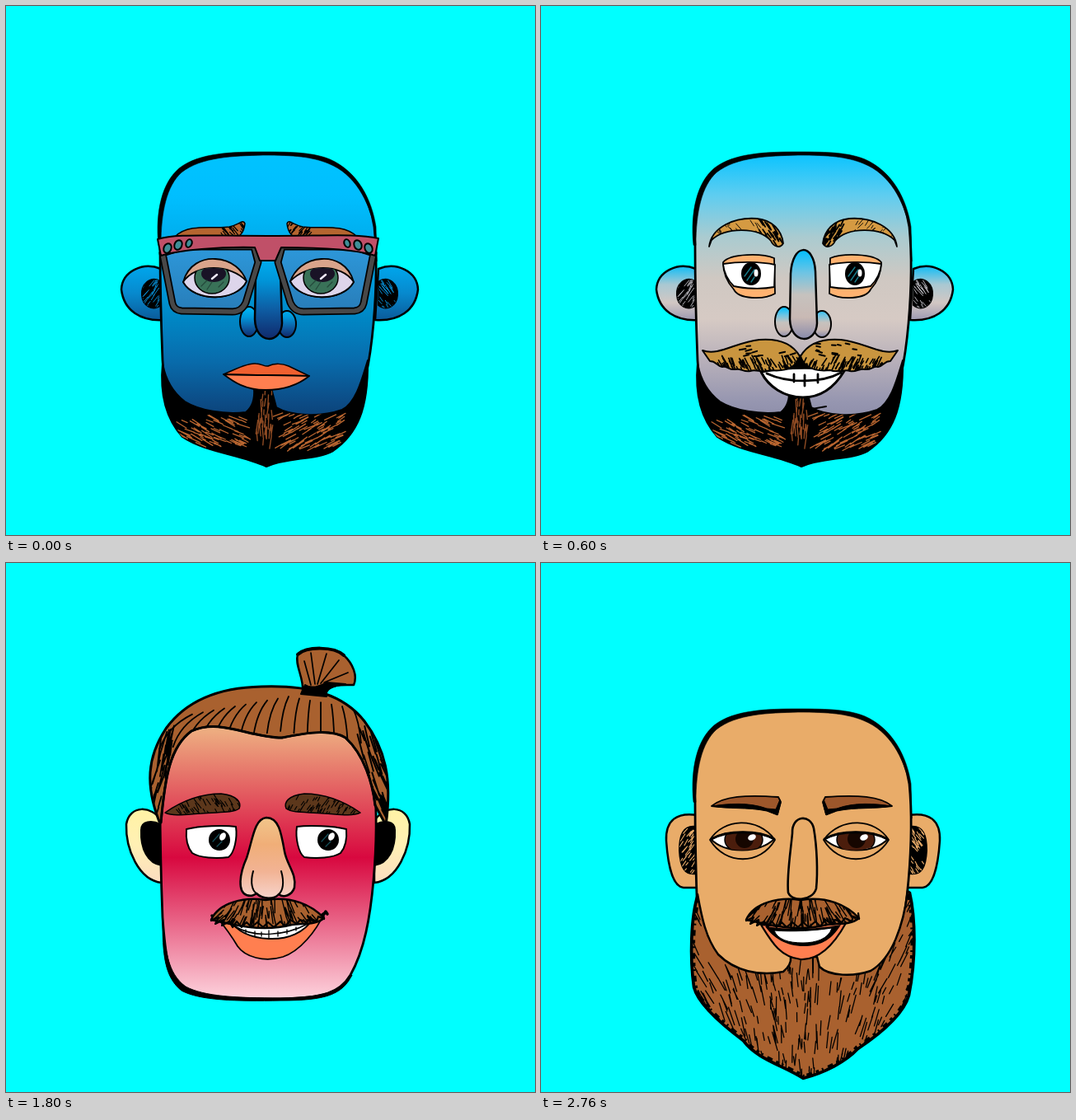
Animation of 642 by 642 pixels, one loop 3 s. Source, as an HTML page with a canvas:

```html
<!DOCTYPE html>
<html lang="en">
<head>
<meta charset="utf-8">
<title>Changing faces</title>
<style>
  html, body { margin: 0; width: 100%; height: 100%; overflow: hidden; background: #0ff; }
  canvas { display: block; }
</style>
</head>
<body>
<canvas id="stage" width="642" height="642"></canvas>
<script>
const ctx = document.getElementById('stage').getContext('2d');
const HOLD = 600;
const SKIN = '#e9ac69', BROWN = '#a9612f', CORAL = '#ff7f50', GOLD = '#c9953f';

let seed = 1;
const random = () => (seed = seed * 16807 % 2147483647) / 2147483647;

function shape(d, fill, width = 2, stroke = '#000') {
  const path = new Path2D(d);
  if (fill) { ctx.fillStyle = fill; ctx.fill(path); }
  if (width) { ctx.lineWidth = width; ctx.strokeStyle = stroke; ctx.stroke(path); }
}
const line = (d, width = 2, stroke) => shape(d, null, width, stroke);

function oval(x, y, rx, ry, fill, width = 0, angle = 0) {
  ctx.beginPath();
  ctx.ellipse(x, y, rx, ry, angle, 0, 7);
  ctx.fillStyle = fill;
  ctx.fill();
  if (width) { ctx.lineWidth = width; ctx.strokeStyle = '#000'; ctx.stroke(); }
}

function gradient(top, bottom, ...colors) {
  const g = ctx.createLinearGradient(0, top, 0, bottom);
  colors.forEach((c, i) => g.addColorStop(i / (colors.length - 1), c));
  return g;
}

function scoped(draw) { ctx.save(); draw(); ctx.restore(); }

// Draws once as is and once mirrored; sum = left x + right x.
function mirrored(sum, draw) {
  draw();
  scoped(() => { ctx.translate(sum, 0); ctx.scale(-1, 1); draw(); });
}
function repeated(dx, draw) {
  draw();
  scoped(() => { ctx.translate(dx, 0); draw(); });
}
function clipped(d, draw) {
  scoped(() => { ctx.clip(new Path2D(d)); draw(); });
}

// Scatters short pen strokes inside a path.
function hatch(d, [x, y, w, h], count, length, angle, color = '#000', width = 1.5) {
  clipped(d, () => {
    ctx.strokeStyle = color;
    ctx.lineWidth = width;
    ctx.beginPath();
    for (let i = 0; i < count; i++) {
      const px = x + w * random(), py = y + h * random();
      const a = (typeof angle === 'function' ? angle(px, py) : angle) + (random() - .5) * .3;
      const l = length * (.5 + random()) / 2;
      ctx.moveTo(px - Math.cos(a) * l, py - Math.sin(a) * l);
      ctx.lineTo(px + Math.cos(a) * l, py + Math.sin(a) * l);
    }
    ctx.stroke();
  });
}

// Pen ticks reaching inward from an edge.
function fringe(area, edge, width, dash) {
  clipped(area, () => {
    ctx.lineCap = 'butt';
    ctx.setLineDash(dash);
    line(edge, width);
    ctx.setLineDash([]);
    line(edge, width * .5);
  });
}

const HEAD = 'M187 290C183 250 191 217 211 199C235 180 275 179 312 179C350 179 372 180 392 188C425 202 442 235 447 268C451 310 449 350 446 385C442 430 435 470 418 500C405 522 385 528 333 529C280 529 235 528 215 516C195 500 193 470 190 430C188 380 187 330 187 290Z';
const CROWN = 'M185 290C181 248 190 214 210 197C234 178 275 177 312 177C350 177 373 178 393 186C427 201 444 235 449 268L450 310L447 268C440 237 424 204 391 191C371 183 350 181 312 181C276 182 237 183 213 202C195 218 188 250 188 290Z';
const JAW = 'M190 430C190 475 192 502 213 519C235 531 280 532 333 531C388 531 408 524 420 500C405 521 385 527 333 528C280 528 240 526 218 514C196 498 193 470 190 430Z';

function head(fill, bald = true) {
  shape(HEAD, fill, 2.8);
  if (bald) shape(CROWN, '#000', .6);
}

function roundEars(fill, streak) {
  mirrored(640, () => {
    shape('M188 319C166 310 141 322 140 344C143 370 164 383 192 381Z', fill, 2.5);
    const inner = 'M187 334C175 327 164 338 165 351C166 364 178 371 188 363Z';
    shape(inner, '#000', 2);
    hatch(inner, [164, 332, 24, 36], 28, 8, 2.2, streak, 1);
  });
}

function pointedEars() {
  mirrored(636, () => {
    shape('M189 313C177 294 150 293 146 317C145 347 161 385 189 388Z', gradient(296, 388, '#fff3a4', '#fff0b4', '#fbdcc0'), 2.5);
    shape('M187 317C177 312 164 313 164 324C163 347 172 365 189 367Z', '#000');
  });
}

function barNose(...colors) {
  const lobe = gradient(366, 402, ...colors);
  oval(295, 383, 11, 18, lobe, 2);
  oval(341, 386, 11, 16, lobe, 2);
  shape('M303 325C305 287 331 287 333 322L335 385C334 410 303 412 302 380Z', gradient(296, 405, ...colors), 2.5);
}

function wideNose() {
  shape('M316 309C301 310 299 338 292 358C283 378 281 399 292 403C298 405 301 403 304 401C312 409 326 408 331 402C337 407 347 403 350 394C353 377 341 367 338 350C334 327 331 309 316 309Z',
    gradient(309, 407, '#f1c58a', '#f0ae78', '#f2b394', '#f7d4cb'), 2.5);
  line('M300 374C296 388 299 398 304 401M334 374C338 388 336 398 331 402', 2);
}

const SHORT_BEARD = 'M190 434C186 475 196 503 214 523C242 542 284 544 316 559C344 547 374 552 397 540C426 520 440 490 439 430C432 453 425 481 408 490C380 500 345 497 328 487L322 464L301 464C302 477 299 487 291 493C265 496 235 491 217 480C201 468 193 450 190 434Z';
function shortBeard() {
  shape(SHORT_BEARD, '#000', 2);
  const flow = x => x < 318 ? .45 : -.5;
  hatch(SHORT_BEARD, [212, 499, 84, 34], 70, 11, flow, '#b8652f', 1.3);
  hatch(SHORT_BEARD, [330, 496, 78, 40], 85, 11, flow, '#b8652f', 1.3);
  hatch(SHORT_BEARD, [304, 466, 20, 66], 34, 12, 1.6, '#8f4b23', 1.4);
}

function sketchPupil(x, y, rx, ry) {
  oval(x, y, rx, ry, '#000');
  line(`M${x - 8} ${y + 3}l8 -11M${x - 5} ${y + 8}l9 -13M${x} ${y + 10}l4 -6`, 1.4, '#177c8b');
  oval(x + 6, y - 1, 2.5, 4.5, '#fff');
}

function boxEyes(lid, white) {
  mirrored(634, () => {
    shape('M221 311C230 300 268 300 283 306L284 349C270 357 240 356 234 344C225 334 221 322 221 311Z', lid, 1.8);
    shape('M221 313C240 310 267 310 284 314L283 341C268 344 247 343 234 340C226 332 222 324 221 313Z', white, 1.8);
  });
  repeated(126, () => sketchPupil(255, 325, 12, 14));
}

function grin() {
  shape('M256 430C275 434 290 428 304 430C316 433 326 429 345 431C362 433 375 431 386 425C377 446 357 471 336 478C313 485 290 478 281 465Q271 448 256 430Z', CORAL, 1.8);
  shape('M271 433C301 440 341 437 373 431C362 449 342 457 319 456C296 455 281 448 271 433Z', '#fff', 2);
  line('M278 441C300 455 338 453 366 438', 1.5);
  line('M291 445v4M302 447v6M310 448v5M319 446v9M330 447v6M341 445v5M352 442v4', 1.3);
  line('M250 428q6 6 22 7M371 433q14 -3 17 -10l2 3', 3.5);
}

const MOUSTACHE = 'M249 433C258 412 289 405 315 409C347 404 371 415 386 431C375 440 360 437 347 439C320 446 290 442 272 438Z';
function bushyMoustache() {
  shape(MOUSTACHE, BROWN, 2.5);
  hatch(MOUSTACHE, [249, 407, 138, 36], 105, 16, x => 1.57 - (x - 316) * .013, '#000', 1.4);
  line('M249 434l9 -4l-4 8l10 -5l-2 7l9 -5l4 7l5 -7l6 7l6 -6l6 6l7 -6l7 6l6 -6l7 6l8 -7l6 6l6 -8l8 5l4 -5l8 3l4 -5l8 4l2 -6l7 3l-1 -7', 2.2);
}

function blueFace() {
  const blue = gradient(180, 530, '#00c3ff', '#00bfff', '#00aeee', '#009cdc', '#0086c4', '#086cac', '#0c4c86', '#0a3060');
  roundEars(gradient(316, 382, '#00a6ec', '#0789cd', '#0b5998'), '#0789cd');
  head(blue);
  shortBeard();
  mirrored(631, () => {
    const brow = 'M205 280C222 263 252 271 271 268C282 266 288 258 290 264C289 274 285 281 274 283Z';
    shape(brow, '#b5652f', 1.5);
    hatch(brow, [262, 262, 28, 16], 26, 8, .9, '#000', 1.2);
  });
  barNose('#00b8f8', '#0096da', '#0e5ca2', '#10286a');
  mirrored(636, () => {
    const lens = 'M190 300L202 361Q204 369 213 370L275 371Q286 371 291 360L306 311L301 292H215Z';
    shape(lens, gradient(293, 370, '#2d98da', '#287db9'), 9);
    line(lens, 5.5, '#484848');
  });
  mirrored(637, () => {
    shape('M215 335C221 313 239 306 254 307C275 308 287 321 292 334C280 359 229 360 215 335Z', '#d9a48b', 1.8);
    shape('M215 335C230 312 273 313 292 334C280 359 229 360 215 335Z', '#ddd5eb', 1.8);
  });
  repeated(132, () => clipped('M215 335C230 312 273 313 292 334C280 359 229 360 215 335Z', () => {
    oval(250, 330, 21, 19, '#397258', 1.5);
    oval(252, 325, 15, 10, '#191326');
    line('M237 340l7 -7M244 344l6 -9M258 341l6 -6', 1.2, '#23483a');
    line('M250 331l6 -5', 2.5, '#eee8f5');
  }));
  shape('M184 283C205 276 240 279 318 279C390 279 425 276 452 282L448 303C430 297 400 293 334 293L327 309H308L302 293C260 292 210 296 188 303Z', '#c05068', 2);
  mirrored(636, () => {
    oval(196, 294, 4.5, 6, '#3f8f98', 2, .4);
    oval(209, 290, 4.5, 6, '#3f8f98', 2, .4);
    oval(222, 288, 3.5, 5, '#3f8f98', 2, .4);
  });
  shape('M264 447C284 438 296 433 303 434C310 434 314 438 318 437C326 433 336 434 343 437L368 449Z', '#f0602f', 1.5);
  shape('M264 447C290 448 340 448 368 449C352 462 335 466 315 466C290 466 276 456 264 447Z', CORAL, 1.8);
}

function goldMoustacheFace() {
  roundEars(gradient(316, 382, '#10bdf6', '#a9c8d2', '#d2c7c3', '#9b98b1'), '#b5b4ba');
  head(gradient(180, 530, '#0ac4ff', '#5fcdf0', '#aacbd0', '#cfc8c2', '#d6cac4', '#b8b0ba', '#9696b0', '#8080a0'));
  shortBeard();
  mirrored(636, () => {
    const brow = 'M204 292C207 268 235 256 262 258C281 260 292 272 294 288C290 295 282 292 279 285C264 268 224 268 207 284Z';
    shape(brow, '#d59a42', 1.8);
    hatch(brow, [207, 258, 60, 24], 30, 6, .9, '#000', .9);
    hatch(brow, [265, 260, 30, 34], 42, 9, 1, '#000', 1.8);
  });
  boxEyes('#ffb270', '#fff');
  barNose('#00bfff', '#6cc4e4', '#c6c2be', '#c9b9b4', '#8588aa');
  line('M329 489l17 -3', 2);
  shape('M267 444C300 438 340 438 368 443C356 463 340 475 318 475C295 475 276 462 267 444Z', '#fff', 3);
  line('M274 446C300 458 340 458 364 445M307 447v9M320 448v13M336 447v10', 2.8);
  shape('M314 424L329 439H300Z', '#000');
  mirrored(629, () => {
    const half = 'M196 418C216 425 236 408 265 405C291 403 306 411 314 425C309 440 296 444 278 442C268 446 261 440 254 443C247 445 241 439 236 441C227 442 226 436 220 438C212 436 213 431 205 431Z';
    shape(half, GOLD, 2);
    hatch(half, [215, 428, 98, 17], 85, 8, 1.1, '#000', 1.6);
    hatch(half, [230, 408, 78, 18], 12, 6, -.2, '#000', 2);
  });
}

const sunburn = () => gradient(185, 530, '#f0c088', '#d8083f', '#fdd4de');

function hipsterFace() {
  pointedEars();
  head(sunburn(), false);
  const edge = 'M188 402C183 445 182 482 200 515C223 552 254 574 285 598L318 615C345 602 385 574 410 558C424 544 440 536 441 529L450 505C453 470 451 430 448 400';
  const beard = edge + 'C443 430 435 455 419 475C404 491 350 492 334 484H300C265 490 234 485 215 470C196 452 190 430 188 402Z';
  shape(beard, '#5f3a1c', 2.5);
  fringe(beard, edge, 12, [7, 3, 3, 5, 10, 4]);
  hatch(beard, [186, 405, 38, 125], 38, 22, 1.35, '#000', 1.8);
  hatch(beard, [205, 505, 110, 95], 60, 26, 1.45, '#000', 1.6);
  hatch(beard, [400, 425, 52, 115], 40, 24, 2, '#000', 1.6);
  line('M219 473C245 489 280 488 299 485M335 485C365 495 403 491 420 474', 2.5);

  const hair = 'M168 298C157 265 157 211 172 180C190 145 225 118 275 111C320 107 370 112 400 129L418 140L440 150C465 165 475 195 478 225C480 260 474 285 460 318L448 322C449 268 438 245 425 225C415 205 405 192 390 190C360 211 320 237 262 244L249 244C226 262 217 274 204 282L191 345C183 330 179 305 168 298Z';
  const lock = 'M256 245L300 215L388 183L390 192C353 220 305 241 256 245Z';
  shape(hair, BROWN, 2.8);
  line('M172 180C190 145 225 118 275 111C320 107 370 112 400 129', 4);
  hatch(hair, [162, 215, 66, 95], 55, 32, 1.85, '#000', 2.2);
  hatch(hair, [436, 215, 42, 105], 55, 30, 1.35, '#000', 2.4);
  hatch(lock, [262, 186, 125, 58], 60, 24, -.5, '#000', 2.8);
  line('M258 243C305 237 353 218 389 190', 4);
  shape('M274 186C248 193 244 222 235 240L219 263C241 249 246 227 253 212Z', '#000', 1);
  line('M205 172C179 195 175 214 168 238M216 245C204 253 199 263 193 280', 3);
  line('M418 141C413 160 396 174 388 191L401 194L419 207', 4);
  line('M393 175C418 184 428 203 434 216M323 126C355 121 382 127 405 139M430 151C451 164 459 180 466 200', 2.2);
  shape('M402 137l10 2l3 -5l4 5l7 -1l0 4l13 1l-9 4l6 4l-12 -2l-9 6l1 -8l-8 4l2 -7Z', '#000', 2);

  mirrored(636, () => {
    const brow = 'M231 270C244 255 276 257 291 281C270 272 248 271 231 270Z';
    shape(brow, GOLD, 1.5);
    hatch(brow, [232, 258, 58, 22], 32, 6, .8, '#000', 1);
  });
  const lens = 'M210 289C240 287 280 288 290 295C300 309 299 338 289 351C278 363 235 362 214 357C200 345 198 300 210 289Z';
  mirrored(639, () => shape(lens, gradient(288, 362, '#9d2343', '#8b1236', '#85052b', '#952b50'), 0));
  boxEyes('#bd875b', '#bfbfbf');
  mirrored(639, () => {
    const frame = 'M178 277C215 272 275 275 302 286Q311 291 320 292V312C312 312 307 318 304 326C299 354 293 370 280 372C248 375 222 374 207 369C193 362 190 335 190 302L180 298Z';
    const ring = new Path2D(frame + lens);
    ctx.fillStyle = '#000';
    ctx.fill(ring, 'evenodd');
    scoped(() => {
      ctx.clip(ring, 'evenodd');
      hatch(frame, [182, 278, 130, 94], 100, 5, (x, y) => y > 300 && y < 355 ? 1.6 : .2, '#2d8c9e', 1.3);
    });
    line(lens, 3);
    shape('M177 296L190 300L193 346Q182 342 178 326Z', '#000', 1);
  });
  wideNose();
  grin();
}

function topKnotFace() {
  pointedEars();
  head(sunburn(), false);
  shape(JAW, '#000', 1);
  const hair = 'M186 314C169 270 171 236 194 201C220 165 260 151 310 150C370 148 410 160 435 192C460 225 469 261 461 318L448 294C445 268 435 233 412 212C395 202 370 205 335 212C295 212 260 188 225 204C199 223 193 260 188 315Z';
  shape(hair, BROWN, 3);
  hatch(hair, [174, 205, 32, 108], 48, 24, 1.8, '#000', 1.8);
  hatch(hair, [430, 190, 36, 118], 70, 24, 1.2, '#000', 2);
  clipped(hair, () => {
    for (let i = 0; i < 16; i++) {
      const x = 196 + i * 15.5, top = 162 + Math.abs(i - 9) * 2.4;
      line(`M${x + (12 - i) * 2.5} ${top}Q${x} ${top + 15} ${x + (i - 12) * .8} ${top + 42}`, 1.8);
    }
  });
  line('M188 315C193 260 199 223 225 204C260 188 295 212 335 212C370 205 395 202 412 212C435 233 445 268 448 294', 2.5);
  const knot = 'M360 156C362 140 350 124 354 111C365 101 398 101 410 112C421 122 427 137 422 148C409 148 395 146 386 158Z';
  shape(knot, BROWN, 2.5);
  shape('M358 159L363 148C370 153 380 150 389 145L412 147C396 149 387 153 389 162Z', '#000');
  line('M370 148L362 119M375 147L370 109M378 147L389 110M382 146L404 118M386 145L415 133', 1.7);
  line('M354 111C365 101 398 101 410 112', 4);
  mirrored(623, () => {
    const brow = 'M193 303C213 289 235 280 261 280C281 282 286 291 283 298C275 304 256 302 237 304C220 305 204 308 193 303Z';
    shape(brow, '#5c371b', 1.5);
    hatch(brow, [200, 281, 84, 24], 55, 7, 1, '#000', 1.1);
  });
  mirrored(632, () => shape('M219 323C235 319 265 318 279 320C281 334 277 352 270 357C255 359 235 358 226 352C220 345 218 335 219 323Z', '#fff', 2));
  repeated(132, () => {
    oval(259, 336, 13, 13, '#000');
    line('M251 338l8 -9M256 344l6 -6', 1.2, '#14505a');
    oval(263, 332, 3.5, 5, '#fff', 0, .5);
  });
  wideNose();
  grin();
  bushyMoustache();
}

function tanFace() {
  mirrored(636, () => {
    shape('M190 306C165 302 151 312 152 337C154 367 160 393 173 394H192Z', SKIN, 2.5);
    const inner = 'M188 320C172 318 168 331 168 349C169 369 174 379 188 377Z';
    shape(inner, '#000', 2);
    hatch(inner, [170, 322, 18, 55], 32, 7, 2.2, SKIN, 1.1);
  });
  head(SKIN);
  const edge = 'M190 402C181 430 180 480 185 515C190 535 217 559 245 580C262 603 293 610 318 626C345 619 370 606 385 590C409 574 440 550 447 525C456 480 455 430 448 400';
  const beard = edge + 'L445 398C440 440 426 480 400 495C380 502 350 502 338 490L335 478H303C304 486 300 491 294 496C265 502 235 495 215 475C200 455 195 430 190 402Z';
  shape(beard, BROWN, 2.5);
  hatch(beard, [184, 405, 268, 220], 430, 16, x => 1.57 + (x - 318) * .004, '#000', 1.3);
  fringe(beard, edge, 10, [4, 4, 2, 6, 7, 5]);
  mirrored(633, () => {
    shape('M207 295C221 283 249 281 288 284L291 290L287 305L274 300C250 294 227 298 207 295Z', '#9d572b', 1.8);
    shape('M208 295C227 292 252 290 274 298L285 299L290 287L291 291L287 306L274 301C250 296 227 299 208 295Z', '#000', 1);
  });
  const opening = 'M206 335C226 324 264 324 283 335C265 352 225 354 206 335Z';
  mirrored(627, () => {
    shape('M205 336C221 310 263 307 284 336C266 367 224 367 205 336Z', SKIN, 1.8);
    shape(opening, '#fff', 2);
  });
  repeated(136, () => clipped(opening, () => {
    oval(246, 336, 23, 16, '#4b1d0c', 1.5);
    oval(247, 335, 11, 11, '#160600');
    oval(256, 333, 5, 3.5, '#fff', 0, -.4);
  }));
  line('M207 335C226 324 264 324 283 335M344 335C363 324 401 324 420 335', 2.8);
  shape('M305 328C304 306 327 304 331 322C335 345 336 375 334 395C330 410 305 412 300 400C298 380 303 350 305 328Z', SKIN, 2.6);
  shape('M267 439C300 443 340 440 370 437C354 466 335 482 315 481C290 478 280 460 267 439Z', CORAL, 2.2);
  shape('M272 441C305 446 338 444 364 439C352 459 337 465 319 465C297 465 282 455 272 441Z', '#000', 0);
  shape('M283 446C305 448 335 446 353 443C349 456 334 461 318 461C300 461 287 457 283 446Z', '#fff', 1);
  bushyMoustache();
}

const faces = [blueFace, goldMoustacheFace, hipsterFace, topKnotFace, tanFace];
let shown = -1;

function tick() {
  const index = Math.floor(performance.now() / HOLD) % faces.length;
  if (index !== shown) {
    shown = index;
    seed = 4217;
    ctx.lineJoin = ctx.lineCap = 'round';
    ctx.fillStyle = '#0ff';
    ctx.fillRect(0, 0, 642, 642);
    faces[index]();
  }
  requestAnimationFrame(tick);
}
tick();
</script>
</body>
</html>
```
